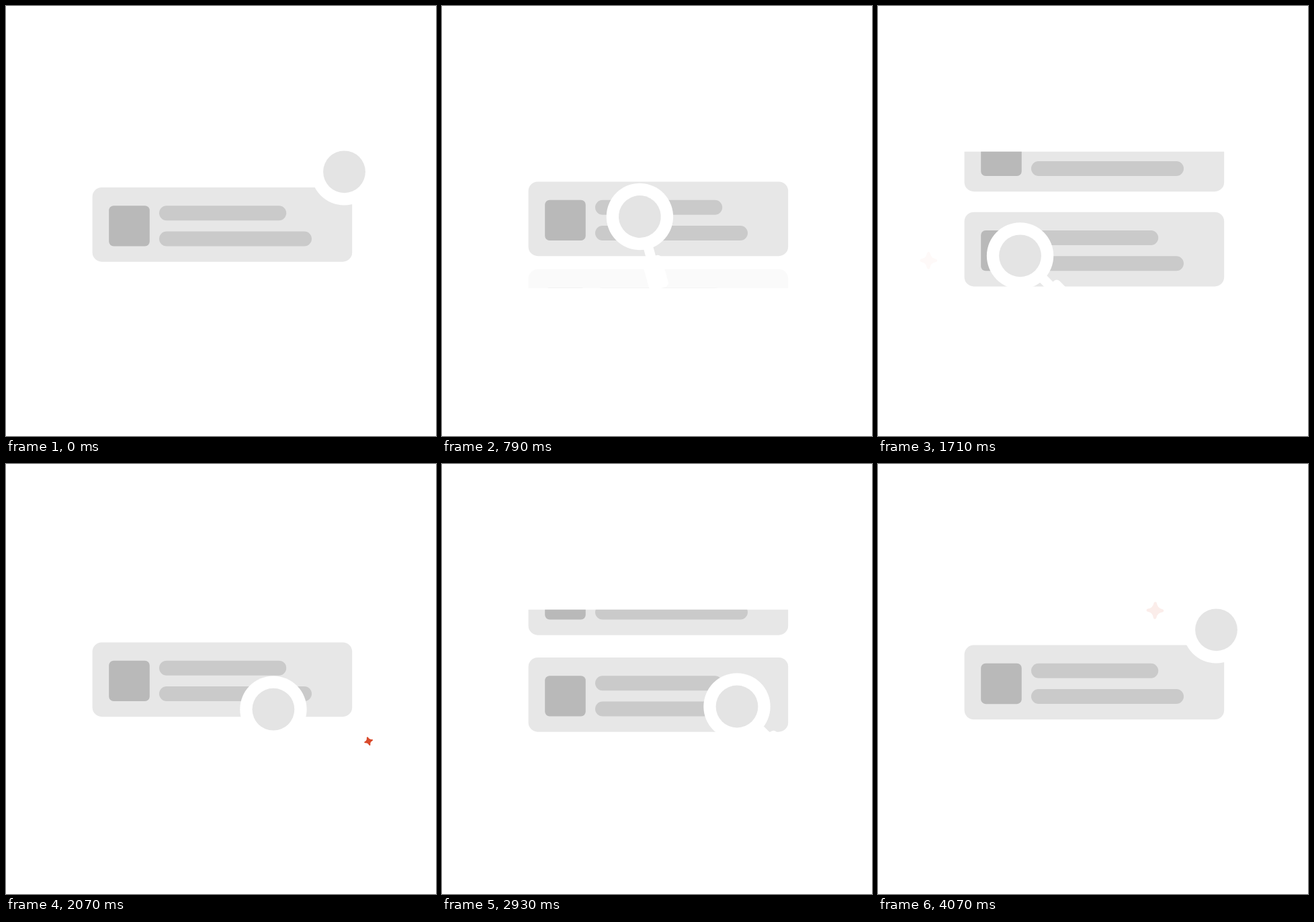
An HTML page with a canvas that plays this animation: 640x640 px, repeating every 4140 ms.

```html
<!DOCTYPE html>
<html lang="en">
<head>
<meta charset="utf-8">
<title>Searching a list</title>
<style>
  html, body { margin: 0; width: 100%; height: 100%; overflow: hidden; background: #fff; }
  canvas { display: block; width: 100vw; height: 100vh; }
</style>
</head>
<body>
<canvas id="stage" width="640" height="640"></canvas>
<script>
const ctx = document.getElementById('stage').getContext('2d');
const LOOP = 4140;
const REST = 270;

const clamp = x => Math.min(1, Math.max(0, x));
const ramp = (x, from, to) => clamp((x - from) / (to - from));
const smooth = x => x * x * (3 - 2 * x);
const mix = (a, b, k) => a + (b - a) * k;
const easeLate = x => smooth(1 - Math.pow(1 - x, 1.7));

function box(x, y, w, h, r, color) {
  ctx.fillStyle = color;
  ctx.beginPath();
  ctx.roundRect(x, y, w, h, r);
  ctx.fill();
}

function disc(r, color) {
  ctx.fillStyle = color;
  ctx.beginPath();
  ctx.arc(0, 0, r, 0, Math.PI * 2);
  ctx.fill();
}

function card(y, alpha = 1) {
  if (alpha <= 0 || y > 420 || y < 100) return;
  box(128.6, y, 386.6, 110.7, 14, '#e7e7e7');
  box(153.2, y + 27.2, 60.6, 60.4, 7, '#b9b9b9');
  box(228, y + 27.2, 189.2, 22, 11, '#cacaca');
  box(228, y + 65.5, 227, 22, 11, '#cacaca');
  if (alpha < 1) {
    ctx.fillStyle = `rgba(255,255,255,${1 - alpha})`;
    ctx.fillRect(127, y - 1, 390, 113);
  }
}

// Each scroll has the moment of its fastest movement and a time stretch.
const scrolls = [
  { mid: 540, stretch: 1 },
  { mid: 1722, stretch: 1 },
  { mid: 2930, stretch: 1.6 }
];
const LEAD = 110;
const BELOW = 397.6;

// Top of the arriving card: speeds up, overshoots, then sinks back.
function arrivingTop(p) {
  if (p < 0) return BELOW - 109.6 * Math.pow(clamp(1 + p / LEAD), 1.62);
  if (p < 60) return mix(288, 241.4, 1 - (1 - p / 60) ** 2);
  return REST - 10 * Math.exp((225 - p) / 157);
}

function drawCards(t) {
  ctx.save();
  ctx.beginPath();
  ctx.rect(100, 216.7, 440, 203.4);
  ctx.clip();
  let p = null;
  for (const s of scrolls) {
    const q = (t - s.mid) / s.stretch;
    if (q >= -LEAD) p = q;
  }
  if (p === null) {
    card(REST);
  } else {
    const top = arrivingTop(p);
    if (p < 60) card(REST - (BELOW - top) / 0.87);
    card(top, ramp(p, -85, -50));
    const gap = 129.5 + Math.max(0, top - 260) * 0.55;
    if (p > 0) card(top + gap, 1 - ramp(p, 150, 275));
  }
  ctx.restore();
}

const right = [503.5, 246.8], left = [161.6, 373.6], low = [437.4, 363.8];

function lensPose(t) {
  if (t < 1400) {
    const k = smooth(ramp(t, 100, 1300));
    return {
      x: mix(right[0], left[0], k),
      y: mix(right[1], left[1], k) - 45.6 * k * (1 - k),
      tilt: 31.5 * Math.sin(Math.PI * k)
    };
  }
  const back = t > 2700;
  const [a, b] = back ? [low, right] : [left, low];
  const start = back ? 2880 : 1557;
  const k = easeLate(ramp(t, start, start + 900));
  return { x: mix(a[0], b[0], k), y: mix(a[1], b[1], k), tilt: 0 };
}

function drawLens(t) {
  const { x, y, tilt } = lensPose(t);
  ctx.save();
  ctx.translate(x, y);
  ctx.rotate((45 + tilt) * Math.PI / 180);
  box(40, -7.3, 30, 14.6, 0, '#fff');
  box(62, -15, 49, 30, 6, '#fff');
  disc(49.7, '#fff');
  disc(31.4, '#e4e4e4');
  ctx.restore();
}

const stars = [
  { x: 75.2, y: 378.8, start: 850 },
  { x: 539.6, y: 412.6, start: 1820 },
  { x: 412.4, y: 218, start: 3250 }
];

function drawStar(star, t) {
  const age = t - star.start;
  if (age < 0 || age > 920) return;
  const g = ramp(age, 0, 500);
  const grow = g < 0.5 ? 2 * g * g : 1 - 2 * (1 - g) ** 2;
  ctx.save();
  ctx.translate(star.x, star.y);
  ctx.rotate(-Math.PI / 2 * smooth(ramp(age, 0, 890)));
  ctx.scale(0.03 + 0.97 * grow, 0.03 + 0.97 * grow);
  ctx.globalAlpha = 1 - smooth(ramp(age, 400, 920));
  ctx.fillStyle = '#d94a2b';
  ctx.beginPath();
  for (let i = 0; i < 4; i++) {
    const a = i * Math.PI / 2;
    const c = a - Math.PI / 4;
    const tipX = 10.6 * Math.cos(a), tipY = 10.6 * Math.sin(a);
    if (i) ctx.quadraticCurveTo(4.8 * Math.cos(c), 4.8 * Math.sin(c),
      tipX + 2.2 * Math.cos(a - 1.4), tipY + 2.2 * Math.sin(a - 1.4));
    ctx.arc(tipX, tipY, 2.2, a - 1.4, a + 1.4);
  }
  const end = -1.4;
  ctx.quadraticCurveTo(3.4, -3.4, 10.6 + 2.2 * Math.cos(end), 2.2 * Math.sin(end));
  ctx.fill();
  ctx.restore();
}

function draw(t) {
  ctx.fillStyle = '#fff';
  ctx.fillRect(0, 0, 640, 640);
  drawCards(t);
  drawLens(t);
  stars.forEach(s => drawStar(s, t));
}

let origin = null;
function tick(now) {
  if (origin === null) origin = now;
  draw(Math.max(0, now - origin) % LOOP);
  requestAnimationFrame(tick);
}
draw(0);
requestAnimationFrame(tick);
</script>
</body>
</html>
```
